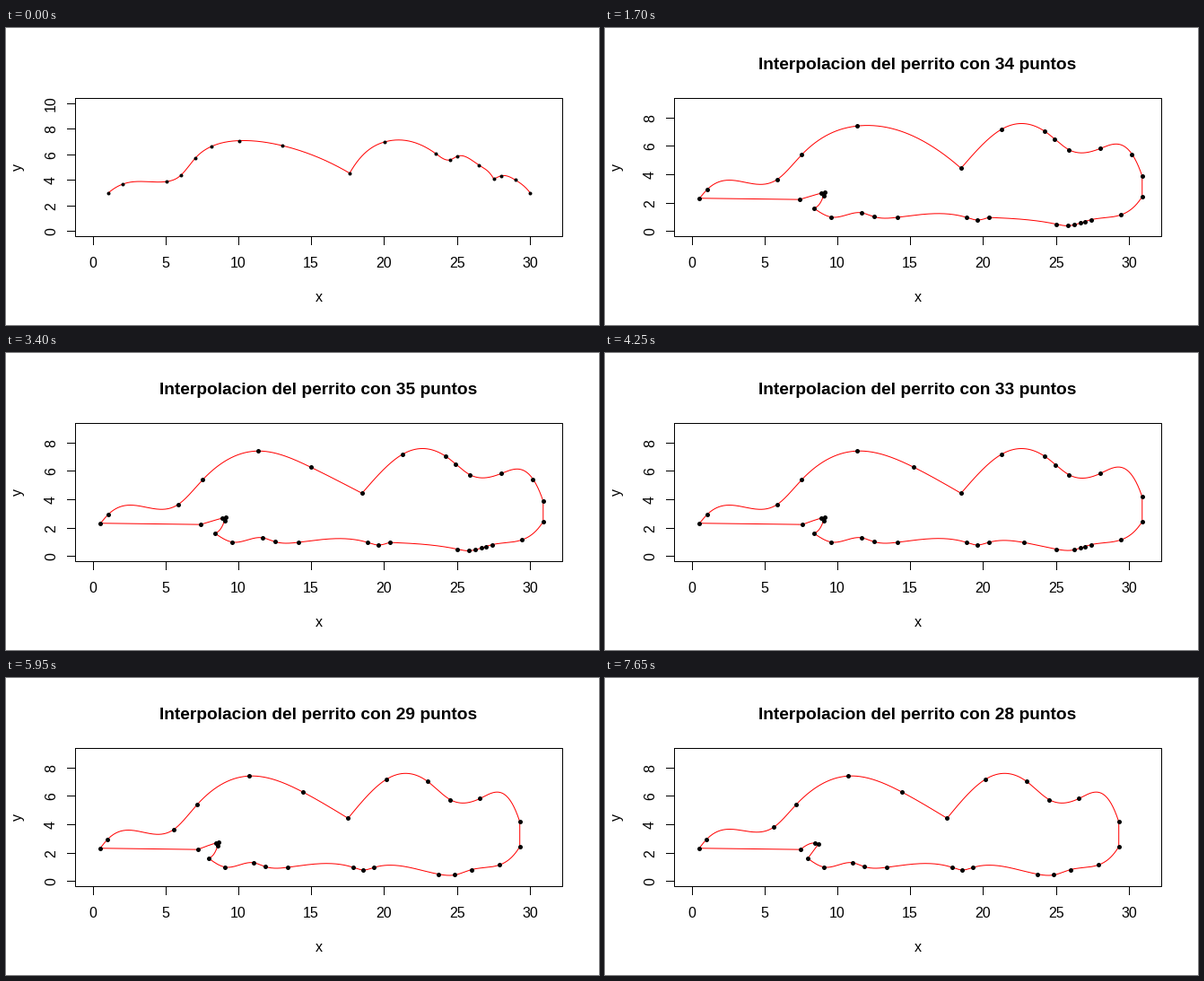
Animation of 661 by 331 pixels, one loop 8 s. Source, as a matplotlib script:

```python
import numpy as np
import matplotlib.pyplot as plt
from matplotlib.animation import FuncAnimation

W, H, DPI = 661, 331, 100
LEFT, RIGHT, TOP, BOTTOM = 77.5, 620.5, 78.5, 232.5
STEP, HOLD, FRAMES = 50, 17, 160


def pt(px):
    return px * 72 / DPI


def to_x(x):
    return LEFT + (np.asarray(x) / 31 + 0.04) / 1.08 * (RIGHT - LEFT)


def to_y(y, top):
    return BOTTOM - (np.asarray(y) / top + 0.04) / 1.08 * (BOTTOM - TOP)


def spline(points, start=None, end=None):
    """Cubic spline; an end without a slope is natural."""
    x, y = np.array(points, float).T
    h, n = np.diff(x), len(x)
    if n == 2:
        return x, y
    d = np.diff(y) / h
    a, b = np.eye(n), np.zeros(n)
    for i in range(1, n - 1):
        a[i, i - 1:i + 2] = h[i - 1], 2 * (h[i - 1] + h[i]), h[i]
        b[i] = 6 * (d[i] - d[i - 1])
    if start is not None:
        a[0, :2], b[0] = (2 * h[0], h[0]), 6 * (d[0] - start)
    if end is not None:
        a[-1, -2:], b[-1] = (h[-1], 2 * h[-1]), 6 * (end - d[-1])
    m = np.linalg.solve(a, b)
    u = np.unique(np.concatenate([x, np.linspace(x[0], x[-1], 300)]))
    k = np.clip(np.searchsorted(x, u, side="right") - 1, 0, n - 2)
    t, s = u - x[k], x[k + 1] - u
    v = ((m[k] * s**3 + m[k + 1] * t**3) / (6 * h[k])
         + (y[k] / h[k] - m[k] * h[k] / 6) * s
         + (y[k + 1] / h[k] - m[k + 1] * h[k] / 6) * t)
    return u, v


def refine(points, xs, end=None):
    """Add points that lie on the spline."""
    curve = spline(points, end=end)
    return sorted(points + [(x, float(np.interp(x, *curve))) for x in xs])


def make_shot(count, strokes, scale=1, top=9, dot=5):
    """Each stroke is (points, start slope, end slope)."""
    xs, ys, points = [], [], set()
    for stroke in strokes:
        u, v = spline(*stroke)
        xs += [to_x(u * scale), [np.nan]]
        ys += [to_y(v, top), [np.nan]]
        points.update(stroke[0])
    px, py = np.array(sorted(points)).T
    title = f"Interpolacion del perrito con {count} puntos" if count else ""
    return dict(title=title, top=top, dot=dot,
                line=(np.concatenate(xs), np.concatenate(ys)),
                dots=(to_x(px * scale), to_y(py, top)))


def profile(body_x, fall, power, muzzle):
    """Upper outline: a spine arching over x = 10, then the head."""
    spine = [(1, 3), (2, 3.7), (5, 3.9)]
    for x in body_x:
        drop = 0.097 * (10 - x)**2.4 if x < 10 else fall * (x - 10)**power
        spine.append((x, 7.1 - drop))
    head = spine[-1:] + [(20, 7), (23.5, 6.1)] + muzzle
    head += [(26.5, 5.18), (27.5, 4.12)]
    return [(spine, 1, -0.67), (head, 2, -2)]


def belly_y(x):
    """Level belly with a chest curve, knee, notch, paw and rump."""
    bumps = [(0.62, 8.35, 0.6), (0.32, 11.6, 0.6), (-0.19, 19.55, 0.45),
             (-0.6, 25.7, 1.5), (1.45, 30.9, 1)]
    return 1 + sum(a * np.exp(-((x - c) / w)**2) for a, c, w in bumps)


def outline(back, head, bellies, jaw_x, leg, fall=None):
    """Whole contour; the belly may come as several splines."""
    bellies = [[(x, belly_y(x)) for x in xs] for xs in bellies]
    hip, chest = bellies[0][0], [head[-1], bellies[-1][-1]]
    jaw = [(jaw_x, 2.25), (8.85, 2.7), leg[-1]]
    strokes = [(back, None, fall), (back[-1:] + head, None, HEAD_END)]
    strokes += [(xs, None, None) for xs in bellies[:-1]]
    strokes.append((bellies[-1], None, 1.6))
    lines = [chest, [hip] + leg, jaw, [back[0], jaw[0]]]
    return strokes + [(line, None, None) for line in lines]


HEAD_END = -3
BACK = [(0.48, 2.34), (1, 2.95), (5.8, 3.65), (7.5, 5.4), (11.3, 7.42),
        (18.45, 4.45)]
HEAD = [(21.25, 7.2), (24.2, 7.05), (25.87, 5.75), (28, 5.83)]
LEG = [(9, 2.53), (9.07, 2.76)]
FRONT = [8.35, 9.55, 11.6, 12.45, 14.1, 18.85, 19.55, 20.35]
PAW = [26.2, 26.65, 26.95, 27.4]
RUMP = [29.45, 30.9]


def humped(x):
    return sorted(BACK + [(x, 6.28)])


def dense(back, fall=None):
    head = refine(HEAD + [(30.9, 3.9)], [24.9, 30.2], HEAD_END)
    rear = FRONT[-1:] + [25, 25.8] + PAW + RUMP
    return outline(back, head, [FRONT, rear], 7.35, LEG, fall)


def light(extra_x=()):
    head = refine(HEAD + [(30.9, 4.2)], extra_x, HEAD_END)
    rear = [22.75, 25] + PAW + RUMP
    return outline(humped(15.2), head, [FRONT + rear], 7.55, LEG)


def short(back, leg, jaw_x=7.55):
    rear = [25, PAW[0], PAW[-1]] + RUMP
    return outline(back, HEAD + [(30.9, 4.2)], [FRONT + rear], jaw_x, leg)


def first_profile():
    strokes = profile([6, 7, 8.1, 10, 13, 17.6], 0.044, 2,
                      [(24.5, 5.6), (25, 5.88)])
    tail = strokes[-1][0][-1:] + [(x, 4.35 - 0.33 * (x - 28)**2)
                                  for x in (28, 29, 30)]
    return strokes + [(tail, 0.33, -1.5)]


back = humped(15.2)
raised = back[:2] + [(5.9, 3.83)] + back[3:]
stub = [(9.12, 2.63)]
shots = [
    make_shot(0, first_profile(), top=10, dot=4),
    make_shot(12, profile([7.3, 10, 13, 17], 0.125, 1.57, [(24.6, 5.2)])),
    make_shot(34, dense(BACK, -0.9)),
    make_shot(35, dense(back)),
    make_shot(35, dense(humped(14.93))),
    make_shot(33, light([24.95])),
    make_shot(32, light()),
    make_shot(29, short(back, LEG), 0.948),
    make_shot(28, short(back, stub), 0.948),
    make_shot(28, short(raised, stub, 7.8), 0.948),
]

fig = plt.figure(figsize=(W / DPI, H / DPI), dpi=DPI, facecolor="white")
ax = fig.add_axes([0, 0, 1, 1])
ax.set_xlim(0, W)
ax.set_ylim(H, 0)
ax.axis("off")


def label(x, y, text, size=16, **kw):
    return ax.text(x, y, text, family="Liberation Sans", fontsize=pt(size),
                   ha="center", va="baseline", rotation_mode="anchor", **kw)


def rule(xs, ys):
    return ax.plot(xs, ys, color="black", lw=pt(1), snap=False,
                   solid_capstyle="butt", solid_joinstyle="miter",
                   zorder=1)[0]


rule([LEFT, RIGHT, RIGHT, LEFT, LEFT], [TOP, TOP, BOTTOM, BOTTOM, TOP])
for value in range(0, 31, 5):
    x = np.floor(to_x(value)) + 0.5
    rule([x, x], [BOTTOM, BOTTOM + 9.5])
    label(x - 0.5, 267, str(value))

y_ticks = []
for value in range(0, 11, 2):
    y_ticks.append((value, rule([], []), label(55, 0, str(value), rotation=90)))

mid = (LEFT + RIGHT) / 2 - 0.5
label(mid, 305, "x")
label(17.5, 155, "y", rotation=90)
title = label(mid, 46.5, "", size=19.2, weight="bold")
curve, = ax.plot([], [], color="red", lw=pt(1), snap=False, zorder=2)
dots, = ax.plot([], [], "o", color="black", mew=0, snap=False, zorder=3)


def update(i):
    shot = shots[i // HOLD]
    title.set_text(shot["title"])
    curve.set_data(*shot["line"])
    dots.set_data(*shot["dots"])
    dots.set_markersize(pt(shot["dot"]))
    for value, tick, text in y_ticks:
        y = np.floor(to_y(value, shot["top"])) + 0.5
        tick.set_data([LEFT - 9.5, LEFT], [y, y])
        text.set_y(y)
        for artist in (tick, text):
            artist.set_visible(value <= shot["top"])
    return [title, curve, dots]


anim = FuncAnimation(fig, update, frames=FRAMES, interval=STEP, repeat=True,
                     repeat_delay=0, blit=False)
plt.show()
```
